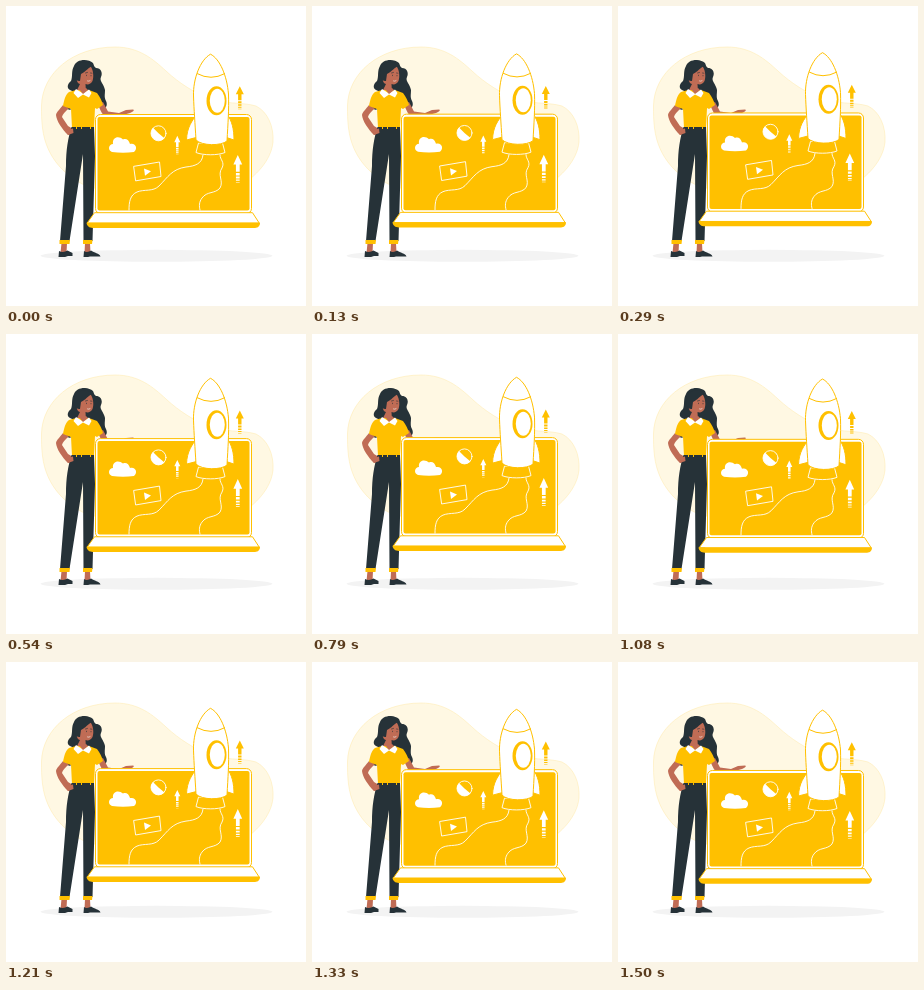
Recreate the animation shown at these times as an HTML page. Size 300 px wide and 300 px high, loop 1.54 s.

```html
<!DOCTYPE html>
<html lang="en">
<head>
<meta charset="utf-8">
<title>Launch</title>
<style>
  html, body { margin: 0; width: 100%; height: 100%; overflow: hidden; background: #fff; }
  svg { display: block; width: 100vw; height: 100vh; }
  .y { fill: #ffc000; }
  .w { fill: #fff; }
  .dark { fill: #263238; }
  .skin { fill: #c06c55; }
  .edge { fill: #fff; stroke: #ffc000; stroke-width: 1; stroke-linejoin: round; }
  .line { fill: none; stroke: #fff; stroke-width: .9; stroke-linecap: round; stroke-linejoin: round; }
</style>
</head>
<body>
<svg viewBox="0 0 300 300">
  <defs>
    <g id="arrow">
      <path d="M0 0L4 8H1.700V14H-1.700V8H-4Z"/>
      <path d="M-1.700 15H1.700V17H-1.700ZM-1.700 18H1.700V19.500H-1.700ZM-1.700 20.500H1.700V21.500H-1.700ZM-1.700 22.500H1.700V23H-1.700Z"/>
    </g>
  </defs>

  <path fill="#fff8e3" stroke="#ffe9a8" stroke-width=".5" d="M35.500 100C36 67 67 41 109 41C133 41 147 53 160 65C174 78 188 86 203 93C216 98 237 96 250 100C262 106 268 121 267 136C265 155 250 170 232 182H85C60 172 40 152 36.500 122C35.500 114 35.500 107 35.500 100Z"/>
  <ellipse cx="150.500" cy="249.800" rx="116" ry="6" fill="#f3f3f3"/>

  <g id="woman">
    <path class="dark" d="M68 60C70 53 82 52 87 57C88 59 88 61 90 62C95 62 97 67 95 71C93 75 98 78 99 84C99 89 98 91 100 95C102 99 100 103 97 102L88 92L74 86C70 89 67 85 64 84C60 82 62 77 65 75C67 70 65 65 68 60Z"/>
    <path class="dark" d="M60 97L65 96L64.500 104L61 103Z"/>
    <path class="skin" d="M92 98L97 96L102 105.500L113 107L120 104L127 103.500C129 104 127 106 124 107L113 110L100 111C97 110 94 104 92 98Z"/>
    <path class="skin" d="M74 64C78 65 80 60 84 60C87.500 63 88 71 86.500 75C85 78 82 79 79.500 78L80 87L75 89L71 84L74 78C70 77 70 71 73 71Z"/>
    <path class="dark" d="M69 61C73 55 83 55 87 60C82 61 80 66 75 68L74 75C70 76 66 70 69 61Z"/>
    <g fill="none" stroke="#263238" stroke-width=".6" stroke-linecap="round">
      <path d="M79.500 67l2-.6M84.500 67l1.500.2M80.500 69.200v.5M85 69.400v.5"/>
      <path stroke="#fff" d="M81.500 75q1.500.7 2.600-.3"/>
    </g>
    <path class="skin" d="M57 99L63 102C59 106 56.500 108 56 111L62 120L67 123L67 128L62 129C56 123 50.500 115 50 109C50.500 106 54 103 57 99Z"/>
    <path class="y" d="M70 84L83 84L91 87C94 91 96 95 97 99L91 103L89 102L88 122H66L65 103L57 100C58 95 59 89 63 86Z"/>
    <path class="w" d="M70 83L77 87.500L83 83.500L85.500 87L83 91.500L77 88.500L72 92L67.500 87Z"/>
    <path class="skin" d="M73 83L80 82L82 84L77 88Z"/>
    <path class="dark" d="M65.500 121H88L89 150L86.500 235H77.500L77 148L63.500 235H54L60 160C60 144 62 132 65.500 121Z"/>
    <path class="skin" d="M60 124L67 122.500L67.500 127L62 129Z"/>
    <path class="y" d="M70 119h1v4h-1zM75 119h1v4h-1zM84 119h1v4h-1z"/>
    <path class="skin" d="M55.500 237H61L60.500 247H54.500ZM79 237H84L84.500 247H78.500Z"/>
    <path class="y" d="M53.500 234H64L63.500 238H53.500ZM77 234H86.500L86 238H77Z"/>
    <path class="dark" d="M53 245C56 246.500 59 246 61.500 244.500L66.500 247V250H62L59 251H52.500ZM78 245C80 246.500 83 246 85 244.500C88 247 93.500 247 94.500 250.500H84L82 251H77.500Z"/>
  </g>

  <g id="launch">
    <rect class="edge" x="89.500" y="108.500" width="156" height="99" rx="5"/>
    <rect class="y" x="91.500" y="111" width="152" height="93.500" rx="2"/>
    <path class="edge" d="M88.500 206.700H246.500L253.200 217H81.200Z"/>
    <path class="y" d="M80.500 216.700H254C254 220 252 221.900 249 221.900H87C83 221.900 81 220 80.500 216.700Z"/>

    <path class="line" d="M197 149C196 158 189 160 180 161C166 163 162 171 153 180C147 186 138 183 131 186C124 189 123 196 123 204"/>
    <path class="line" d="M214 149C214 154 219 156 216 162C211 169 218 175 214 182C209 188 201 185 196 192C193 196 193 200 194 204"/>

    <path class="w" d="M106 146C101 144 103 138 107 138C106 131 113 129.500 117 133.500C120 132 123 134 124 138C130 136.500 132 143 128 146Q117 147.500 106 146Z"/>
    <circle class="line" cx="152.500" cy="127.300" r="7.500"/>
    <path class="w" d="M152.500 127.300L147 121.800A7.700 7.700 0 0 0 158.500 132.300Z"/>
    <path class="line" d="M128 160.300L153.500 156L155 170.500L130 174.800Z"/>
    <path class="w" d="M138 162.500L145 165.300L139 169.800Z"/>

    <use href="#arrow" class="y" transform="translate(233.800 80.300)"/>
    <use href="#arrow" class="w" transform="translate(231.800 149) scale(1.100 1.200)"/>
    <use href="#arrow" class="w" transform="translate(171.300 129.800) scale(.750 .800)"/>

    <path class="y" stroke="#fff" stroke-width=".9" stroke-linejoin="round" d="M192.500 137H216.500L219 146.500C212 149.500 197 149.500 190 146.500Z"/>
    <path class="edge" d="M191 108C186 115 181 121 180.500 134L192 131ZM221 108C226 115 228 123 228 134L219 131Z"/>
    <path class="edge" d="M204.500 48.200C194 54 187 73 187.500 90C188 104 189 117 190 134C196 140 215 140 221 135C222 117 223 104 222.500 88C221 70 214 53 204.500 48.200Z"/>
    <path fill="none" stroke="#ffc000" d="M191 67.500Q205 75 219 67.500"/>
    <ellipse class="y" cx="210.500" cy="94.700" rx="10" ry="14.500"/>
    <ellipse class="w" cx="211.300" cy="94.700" rx="7.500" ry="12"/>
  </g>
</svg>
<script>
  const LOOP = 1540, RISE = 4.9;
  const launch = document.getElementById('launch');

  function draw(now) {
    const phase = (now % LOOP) / LOOP;
    const y = -RISE * (1 - Math.cos(phase * 2 * Math.PI)) / 2;
    launch.setAttribute('transform', `translate(0 ${y.toFixed(3)})`);
  }

  const start = performance.now();
  function tick() {
    draw(performance.now() - start);
    requestAnimationFrame(tick);
  }
  tick();
</script>
</body>
</html>
```
